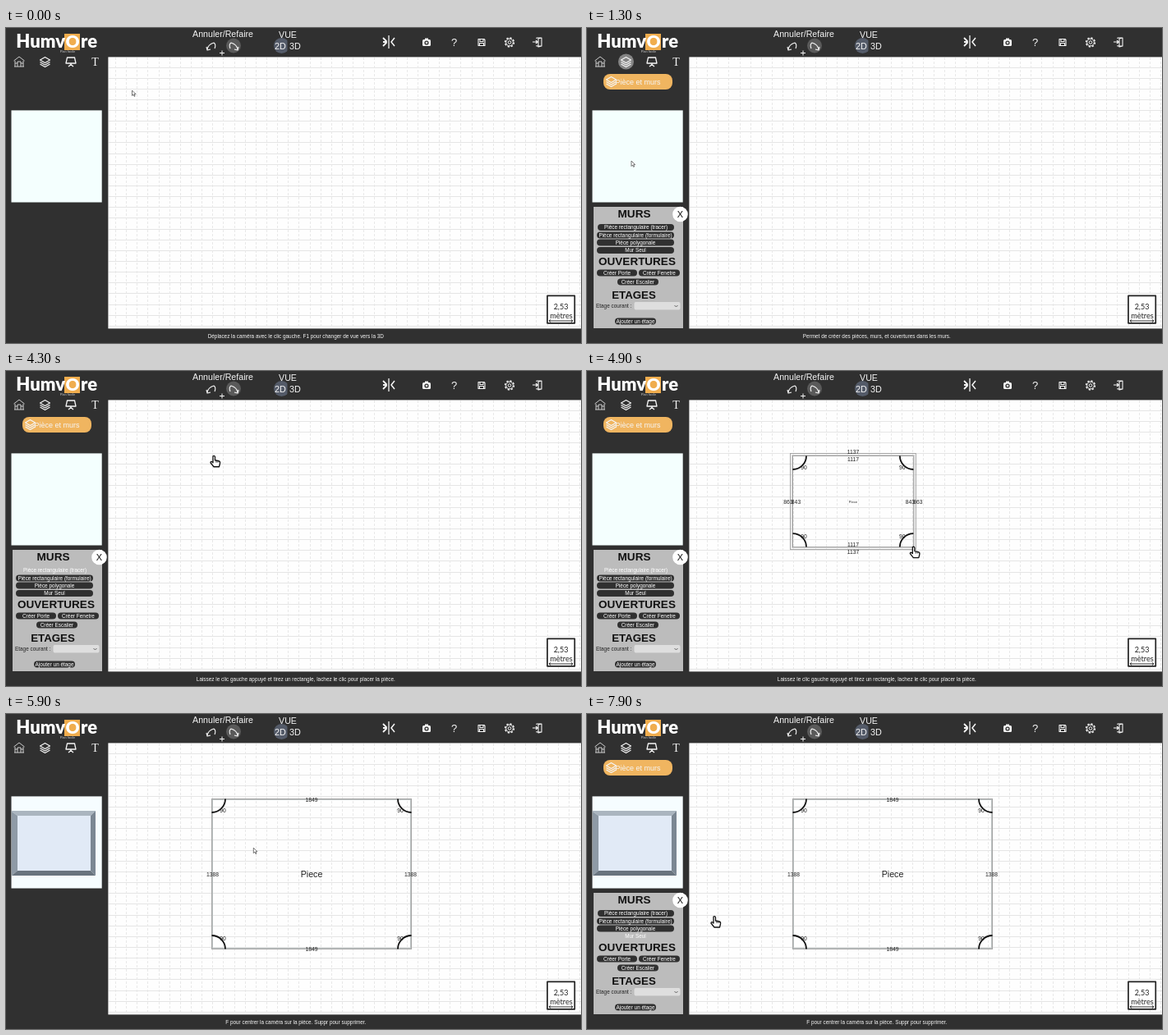
These frames come from a looping animation (700x384 px, 8 s). An HTML page with a canvas:

```html
<!DOCTYPE html>
<html lang="fr">
<head>
<meta charset="utf-8">
<style>
html, body { margin: 0; width: 100%; height: 100%; overflow: hidden; background: #303030; }
canvas { display: block; }
</style>
</head>
<body>
<canvas id="stage" width="700" height="384"></canvas>
<script>
const c = document.getElementById('stage').getContext('2d');
const LOOP = 8000, STEP = 100, DARK = '#303030', WHITE = '#f5f5f5';
const SANS = '"Liberation Sans", Arial, sans-serif';
const ROUND = 'Lato, sans-serif';
const LAYERS_ON = 600, TRACE = 3800, DRAG = 4500, DROP = 5200;
const SELECT = 5600, REOPEN = 6200, WALL = 7400;

// Pointer path: time, x, y
const path = [
  [0, 153.5, 76], [500, 48, 42], [700, 48, 42], [1300, 54, 162], [1900, 60, 205],
  [2400, 67, 250], [2700, 67, 250], [3300, 60, 243], [3800, 60, 243],
  [4200, 254, 104], [4500, 250, 103], [5200, 493, 287], [5500, 493, 287],
  [5700, 440, 230], [6200, 46, 40], [6500, 46, 40], [7100, 58, 269],
  [7400, 58, 269], [7800, 155, 247], [8000, 155, 247]
];

function pointer(t) {
  const i = path.findIndex(p => p[0] > t);
  const [t0, x0, y0] = path[i - 1], [t1, x1, y1] = path[i];
  const u = (t - t0) / (t1 - t0), e = u * u * (3 - 2 * u);
  return [x0 + (x1 - x0) * e, y0 + (y1 - y0) * e];
}

function text(s, x, y, size, color = WHITE, align = 'center', font = SANS, weight = 400) {
  c.font = `${weight} ${size}px ${font}`;
  c.fillStyle = color;
  c.textAlign = align;
  c.fillText(s, x, y);
}
function box(x, y, w, h, color) {
  c.fillStyle = color;
  c.fillRect(x, y, w, h);
}
function pill(x, y, w, h, r, color) {
  c.fillStyle = color;
  c.beginPath();
  c.roundRect(x, y, w, h, r);
  c.fill();
}
function disc(x, y, r, color) {
  c.fillStyle = color;
  c.beginPath();
  c.arc(x, y, r, 0, 7);
  c.fill();
}
function line(d, x = 0, y = 0, color = WHITE, width = 1, fill) {
  const p = new Path2D(d);
  c.save();
  c.translate(x, y);
  if (fill) { c.fillStyle = fill; c.fill(p); }
  c.strokeStyle = color;
  c.lineWidth = width;
  c.lineJoin = 'round';
  c.stroke(p);
  c.restore();
}

function layers(x, y) {
  line('M-6-2L0-5.5 6-2 0 1.5ZM-6 .5L0 4 6 .5M-6 3L0 6.5 6 3', x, y, WHITE, 1.2);
}

function header(active) {
  box(71, 7, 19, 20, '#f0ad4e');
  text('Humv', 72, 24, 22, '#fff', 'right', ROUND, 900);
  text('O', 81, 24, 21, '#fff', 'center', ROUND, 900);
  text('re', 91, 24, 22, '#fff', 'left', ROUND, 900);
  text('Plan facile', 75, 29.5, 4, '#ccc');

  text('Annuler/Refaire', 264, 11, 10.65);
  text('VUE', 343, 12, 10.65);
  disc(277, 21.5, 9, '#5a5a5a');
  line('M-5 4Q-4-2 3-4Q6-2 4 3M-6 1L-5 5-1 4', 250, 22, WHITE, 1.1);
  line('M5 4Q4-2-3-4Q-6-2-4 3M6 1L5 5 1 4', 277, 22, WHITE, 1.1);
  line('M-3 0H3M0-3V3', 263, 30.5);
  c.save();
  c.beginPath();
  c.rect(324, 12, 18.5, 20);
  c.clip();
  disc(335.5, 21.5, 9.5, '#545b69');
  c.restore();
  text('2D', 334, 25.5, 10.8);
  text('3D', 352, 25.5, 10.8);

  // Toolbar on the right
  line('M0-8V8', 466, 17, WHITE, 1.3);
  line('M-7-5L-3-1V1L-7 5M-7 0H-3', 466, 17, WHITE, 1.8);
  line('M7-5L3 0 7 5', 466, 17, WHITE, 1.5);
  pill(507, 14, 10, 8, 1.5, WHITE);
  box(510, 12.5, 4, 2, WHITE);
  disc(512, 18, 2.6, DARK);
  disc(512, 18, 1.3, WHITE);
  text('?', 545.5, 22, 13);
  line('M-4-4H3L4-3V4H-4ZM-2-4V-1H2V-4M-2.5 4V1H2.5V4', 579, 17.5, WHITE, 1.1);
  c.setLineDash([2.3, 1.9]);
  line('M5.4 0A5.4 5.4 0 1 1-5.4 0A5.4 5.4 0 1 1 5.4 0', 613, 17.5, WHITE, 1.5);
  c.setLineDash([]);
  line('M4.3 0A4.3 4.3 0 1 1-4.3 0A4.3 4.3 0 1 1 4.3 0M1.8 0A1.8 1.8 0 1 1-1.8 0A1.8 1.8 0 1 1 1.8 0',
    613, 17.5, WHITE, 1);
  line('M-1-4V-5H5V5H-1V4M1-4L5-5M1-4V6L5 5M-6 0H0M-2-2L0 0-2 2', 647, 17, WHITE, 1.1);

  // Tabs on the left
  line('M-6.5-1L0-6 6.5-1M-5-1V6M5-1V6M-2 6V0H2V6M-5 2H-2M2 2H5M-6 6H6', 16, 41, '#ddd', .9);
  if (active) disc(47.5, 41, 9.5, '#858585');
  layers(47.5, 41);
  line('M-4.5-5H4.5L6 2H-6ZM0 2V5M-3 6L0 3.5 3 6', 79, 41, WHITE, 1.3);
  text('T', 108.5, 46, 14, WHITE, 'center', '"Liberation Serif", serif');
}

function preview(room) {
  box(6.5, 100.4, 110.2, 112.1, room ? '#f6fdff' : '#f4fffe');
  if (!room) return;
  const face = (d, color) => { c.fillStyle = color; c.fill(new Path2D(d)); };
  face('M7 118H109L103 124H14L7 119Z', '#aab5bf');
  face('M109 118V197L103 191V124Z', '#7b8793');
  face('M7 119L14 124V191L7 197Z', '#8e9aa6');
  face('M7 197L14 191H103L109 197Z', '#69747f');
  box(14, 124, 89, 67, '#e1eaf6');
}

const buttons = [
  ['Pièce rectangulaire (tracer)', 13, 239, 93],
  ['Pièce rectangulaire (formulaire)', 12, 248.5, 94],
  ['Pièce polygonale', 12, 257.5, 94],
  ['Mur Seul', 12, 267, 94],
  ['Créer Porte', 12, 294.5, 49],
  ['Créer Fenetre', 63, 294.5, 50],
  ['Créer Escalier', 37, 305.5, 50],
  ['Ajouter un étage', 34, 353.5, 50]
];

function panel(lit) {
  pill(20, 56, 84, 19, 8, '#f0b560');
  layers(29.5, 65);
  text('Pièce et murs', 62, 69, 9);

  box(8, 218, 109, 148, '#bcbcbc');
  text('MURS', 57.5, 231, 13.6, '#111', 'center', SANS, 700);
  text('OUVERTURES', 61, 289, 13.5, '#111', 'center', SANS, 700);
  text('ETAGES', 57, 329.5, 13.3, '#111', 'center', SANS, 700);
  for (const [s, x, y, w] of buttons) {
    if (s !== lit) pill(x, y, w, 8, 4, '#303030');
    text(s, x + w / 2, y + 6.4, 6.4, '#fff');
  }
  text('Etage courant :', 11, 341, 6.4, '#222', 'left');
  pill(57.5, 334, 56, 9.5, 2, '#dedede');
  line('M-2-1L0 1 2-1', 108.5, 339, '#555', .9);
  disc(113.5, 227, 9.3, '#fff');
  text('X', 113.5, 231, 11, '#111');
}

function plan() {
  box(124.4, 35.4, 576, 331, '#fefefe');
  for (let y = 47.5; y < 366; y += 13.14) box(125, Math.round(y), 576, 1, '#e5e5e5');
  c.setLineDash([3, 2]);
  for (let x = 133; x < 700; x += 13.14) line('M0 36V366', Math.round(x) + .5, 0, '#e8e8e8');
  c.setLineDash([]);

  line('M659 326.4H692.3V359.8H659Z', 0, 0, '#222', 1.7, '#fff');
  text('2,53', 675.5, 343, 9, '#222', 'center', ROUND);
  text('mètres', 676, 353.7, 9.2, '#222', 'center', ROUND);
  line('M661 357H690M663 355.5L661 357 663 358.5M688 355.5L690 357 688 358.5', 0, 0, '#222', .9);
}

function room(x2, y2, selected) {
  const x1 = 250.5, y1 = 103.5, w = x2 - x1, h = y2 - y1;
  const mx = x1 + w / 2, my = y1 + h / 2;
  const frame = (g, color) => {
    c.strokeStyle = color;
    c.lineWidth = 1;
    c.strokeRect(x1 - g, y1 - g, w + 2 * g, h + 2 * g);
  };
  const dim = (s, x, y) => text(s, x, y + 2.5, 6.75, '#222');
  const cm = (n, full, px) => Math.round(n * px / full);

  if (selected) {
    frame(0, '#a5a5a5');
    frame(-1, '#bcc2c2');
  } else {
    frame(3, '#a3a3a3');
    frame(1, '#d0d0d0');
    frame(0, '#a3a3a3');
  }
  if (w > 34 && h > 34) {
    c.strokeStyle = '#111';
    c.lineWidth = 1.8;
    [[x1, y1, 0], [x2, y1, 1], [x2, y2, 2], [x1, y2, 3]].forEach(([x, y, q]) => {
      c.beginPath();
      c.arc(x, y, 16.5, q * Math.PI / 2, (q + 1) * Math.PI / 2);
      c.stroke();
      dim('90', x + (x === x1 ? 13.5 : -13.5), y + (y === y1 ? 13.5 : -13));
    });
  }
  const iw = cm(1849, 243, w), ih = cm(1388, 183, h), off = selected ? 0 : 3;
  dim(iw, mx, y1 + 1 + off);
  dim(iw, mx, y2 - .5 - off);
  dim(ih, x1 + 1 + off, my);
  dim(ih, x2 - 1 - off, my);
  if (!selected) {
    dim(iw + 20, mx, y1 - 5.5);
    dim(iw + 20, mx, y2 + 6);
    dim(ih + 20, x1 - 5.5, my);
    dim(ih + 20, x2 + 5.5, my);
  }
  text('Piece', mx, my + (selected ? 4 : 1.5), selected ? 10.7 : 4.2, '#222');
}

function cursor(x, y, hand) {
  if (hand) {
    line('M-1 0Q1-1 1.5 1V5L6 6Q8 6.5 7.5 9L6.5 13H0L-4 8Q-4 6-2 7L-1 8Z', x, y, '#111', 1.3, '#fff');
    line('M3 6V8M5 6.5V8', x, y, '#111', .8);
  } else {
    line('M0 0V6.5L1.5 5 2.6 7.4 3.6 7 2.6 4.6H4.6Z', x, y, '#555', .8, '#fff');
  }
}

function status(t) {
  if (t < LAYERS_ON) return 'Déplacez la caméra avec le clic gauche. F1 pour changer de vue vers la 3D';
  if (t < TRACE) return 'Permet de créer des pièces, murs, et ouvertures dans les murs.';
  if (t < DROP) return 'Laissez le clic gauche appuyé et tirez un rectangle, lachez le clic pour placer la pièce.';
  return t < SELECT ? '' : 'F pour centrer la caméra sur la pièce. Suppr pour supprimer.';
}

function draw(t) {
  const during = (a, b) => t >= a && t < b;
  const [x, y] = pointer(t);
  box(0, 0, 700, 384, DARK);
  plan();
  header(during(LAYERS_ON, TRACE) || during(REOPEN, WALL));
  preview(t >= SELECT);
  if (during(LAYERS_ON, DROP) || t >= REOPEN)
    panel(during(TRACE, DROP) ? buttons[0][0] : t >= WALL ? buttons[3][0] : '');
  if (t > DRAG) {
    const done = t >= DROP;
    room(done ? 493.5 : Math.max(x, 252), done ? 286.5 : Math.max(y, 105), t >= SELECT);
  }
  text(status(t), 352.8, 378, 6.4);
  cursor(x, y, during(TRACE, DROP) || t >= WALL);
}

const start = performance.now();
function tick() {
  const t = (performance.now() - start) % LOOP;
  draw(Math.floor(t / STEP) * STEP);
  requestAnimationFrame(tick);
}
tick();
</script>
</body>
</html>
```
